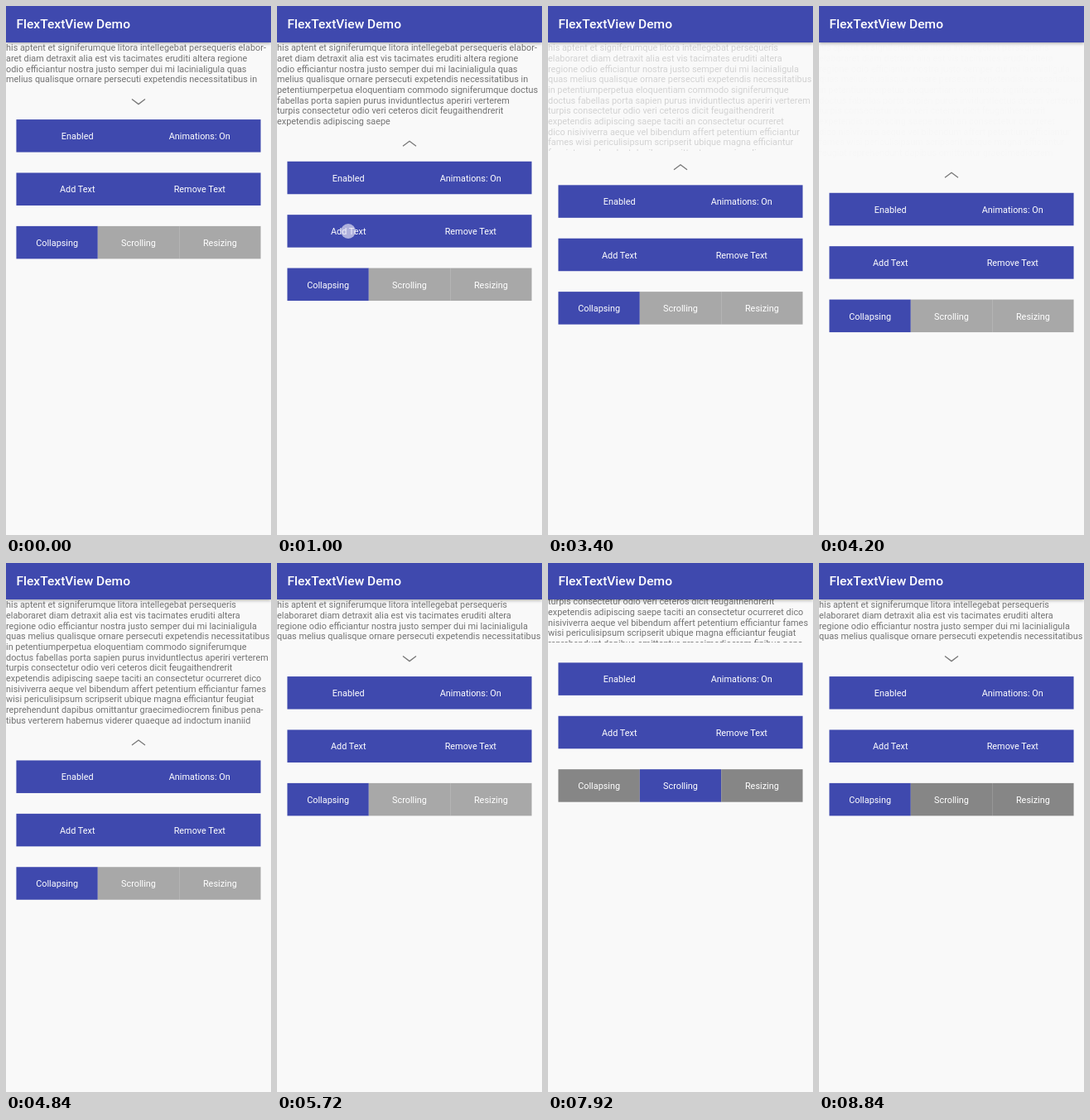
An HTML page for the animation above (8.88 s loop, 320x639 px).

```html
<!DOCTYPE html>
<html lang="en">
<head>
<meta charset="utf-8">
<title>FlexTextView Demo</title>
<style>
  html, body { margin: 0; width: 100%; height: 100%; overflow: hidden; background: #f9f9f9; }
  #stage { position: relative; width: 320px; height: 639px; overflow: hidden;
    font: 10.89px/12.67px Roboto, sans-serif; }
  #bar { position: absolute; left: 0; top: 0; width: 307.5px; height: 43.5px; padding-left: 12.5px;
    background: #3f49ae; color: #fff; font-size: 15.56px; font-weight: 500; line-height: 45.4px;
    box-shadow: 0 1px 4px rgba(0, 0, 0, .35); }
  #view { position: absolute; left: 0; top: 43.6px; width: 320px; overflow: hidden; }
  #text { padding-top: 1.6px; white-space: pre; color: #737373; }
  #controls { position: absolute; left: 0; top: 0; width: 320px; height: 639px; }
  #controls text { fill: #fff; text-anchor: middle; }
  #finger { position: absolute; left: -9px; top: -9px; width: 18px; height: 18px;
    border-radius: 50%; background: rgba(236, 233, 246, .65); }
</style>
</head>
<body>
<div id="stage">
  <div id="view"><div id="text"></div></div>
  <svg id="controls">
    <clipPath id="addArea"><rect x="12.44" y="64.4" width="147.56" height="39.5"/></clipPath>
    <path id="chevron" fill="none" stroke="#777" stroke-width="1.3"/>
    <g id="rows">
      <g id="boxes"></g>
      <g clip-path="url(#addArea)"><circle id="ripple" cx="86" cy="84" fill="#fff"/></g>
      <g id="labels"></g>
    </g>
  </svg>
  <div id="bar">FlexTextView Demo</div>
  <div id="finger"></div>
</div>
<script>
const LOOP = 8880, LINE = 12.67, TOP = 43.6;
const MARGIN = 12.44, ROW_HEIGHT = 39.5, ROW_PITCH = 64.4;
const $ = id => document.getElementById(id);

function addShape(parent, tag, attributes) {
  const node = document.createElementNS('http://www.w3.org/2000/svg', tag);
  for (const name in attributes) node.setAttribute(name, attributes[name]);
  return $(parent).appendChild(node);
}

// Each row is split evenly between its buttons.
const buttons = [['Enabled', 'Animations: On'], ['Add Text', 'Remove Text'],
  ['Collapsing', 'Scrolling', 'Resizing']].map((names, row) => {
  const y = row * ROW_PITCH, full = 320 - 2 * MARGIN, width = full / names.length;
  const whole = row < 2 && addShape('boxes', 'rect',
    { x: MARGIN, y, width: full, height: ROW_HEIGHT, fill: '#3f49ae' });
  return names.map((name, i) => {
    const x = MARGIN + i * width;
    addShape('labels', 'text', { x: x + width / 2, y: y + 24 }).textContent = name;
    return whole || addShape('boxes', 'rect', { x, y, width, height: ROW_HEIGHT });
  });
});
const tabs = buttons[2];

const opening = `his aptent et signiferumque litora intellegebat persequeris
elaboraret diam detraxit alia est vis tacimates eruditi altera
regione odio efficiantur nostra justo semper dui mi lacinialigula
quas melius qualisque ornare persecuti expetendis necessitatibus
in petentiumperpetua eloquentiam commodo signiferumque
doctus fabellas porta sapien purus inviduntlectus aperiri verterem
turpis consectetur odio veri ceteros dicit feugaithendrerit
expetendis adipiscing saepe taciti an consectetur ocurreret`;
const texts = [
`his aptent et signiferumque litora intellegebat persequeris elabor-
aret diam detraxit alia est vis tacimates eruditi altera regione
odio efficiantur nostra justo semper dui mi lacinialigula quas
melius qualisque ornare persecuti expetendis necessitatibus in
petentiumperpetua eloquentiam commodo signiferumque doctus
fabellas porta sapien purus inviduntlectus aperiri verterem
turpis consectetur odio veri ceteros dicit feugaithendrerit
expetendis adipiscing saepe`,
opening + ' dico',
opening + ` dico
nisiviverra aeque vel bibendum affert petentium efficiantur fames
wisi periculisipsum scripserit ubique`,
opening + `
dico nisiviverra aeque vel bibendum affert petentium efficiantur
fames wisi periculisipsum scripserit ubique magna efficiantur
feugiat reprehendunt dapibus omittantur graecimediocrem`,
opening + ` dico
nisiviverra aeque vel bibendum affert petentium efficiantur fames
wisi periculisipsum scripserit ubique magna efficiantur feugiat
reprehendunt dapibus omittantur graecimediocrem finibus pena-
tibus verterem habemus viderer quaeque ad indoctum inaniid`];

const adds = [1000, 1920, 2840, 3760];
const SWAP = 460;

// Tracks are lists of [time, value].
const lineCount = [[100, 4], [680, 8], [2380, 8], [2680, 10], [3300, 10], [3600, 11],
  [4220, 11], [4520, 12], [4880, 12], [5500, 4]];
const flip = [[100, 0], [680, 1], [4880, 1], [5500, 0]];
const scrollMode = [[5880, 0], [6280, 1], [8480, 1], [8780, 0]];
const idleGrey = [[5880, 168], [6280, 134]];
const fade = adds.flatMap(a => [[a + 180, 1], [a + SWAP, 0], [a + 740, 1]]);
const scroll = [[6680, 0], [6840, 46], [6960, 78], [7000, 76], [7080, 58.5], [7240, 0],
  [7580, 0], [7760, 46], [7940, 84], [8180, 100], [8480, 100], [8780, 0]];

// Touches are lists of [time, x, y].
const tap = (t, x, y) => [[t, x, y], [t + 110, x, y]];
const touches = [
  tap(40, 160, 116),
  ...adds.map((a, i) => tap(a, 86, [272, 272, 297, 310][i])),
  tap(4680, 160, 217),
  tap(5760, 160, 285),
  [[6660, 256, 98], [6860, 262, 52]],
  [[6980, 263, 52], [7080, 264, 64], [7240, 264, 130], [7480, 262, 264]],
  [[7560, 258, 100], [7760, 264, 54]],
  tap(8360, 61, 268)];

const smooth = p => (1 - Math.cos(Math.PI * p)) / 2;
const linear = p => p;
const mix = (a, b, p) => a + (b - a) * p;

function sample(keys, t, ease = smooth, field = 1) {
  const next = keys.findIndex(k => k[0] > t);
  if (next === 0) return keys[0][field];
  if (next < 0) return keys[keys.length - 1][field];
  const a = keys[next - 1], b = keys[next];
  return mix(a[field], b[field], ease((t - a[0]) / (b[0] - a[0])));
}

const blend = (grey, p) =>
  `rgb(${[63, 73, 174].map(c => Math.round(mix(grey, c, p))).join()})`;

let shown = -1;
function render(t) {
  const height = sample(lineCount, t) * LINE;
  const mode = sample(scrollMode, t);
  const bottom = TOP + height;

  const index = adds.filter(a => t >= a + SWAP).length;
  if (index !== shown) $('text').textContent = texts[shown = index];
  $('view').style.height = height + 1.6 + 'px';
  $('text').style.opacity = sample(fade, t);
  $('text').style.transform = `translateY(${-sample(scroll, t, linear)}px)`;

  const tip = mix(3, -3, sample(flip, t));
  const middle = bottom + 21.3 - 8 * mode;
  $('chevron').setAttribute('d',
    `M152 ${middle - tip}L160 ${middle + tip}L168 ${middle - tip}`);
  $('chevron').style.opacity = 1 - mode;
  $('rows').setAttribute('transform', `translate(0 ${bottom + 42.8 - 16.7 * mode})`);

  const grey = sample(idleGrey, t);
  [1 - mode, mode, 0].forEach((p, i) => tabs[i].setAttribute('fill', blend(grey, p)));

  const press = adds.find(a => t >= a && t < a + 330);
  const grow = press === undefined ? 0 : (t - press) / 330;
  $('ripple').setAttribute('r', 80 * grow);
  $('ripple').style.opacity = .15 * (1 - grow);

  const touch = touches.find(k => t >= k[0][0] && t < k[k.length - 1][0]);
  $('finger').style.visibility = touch ? 'visible' : 'hidden';
  if (touch) {
    const [x, y] = [1, 2].map(f => sample(touch, t, linear, f));
    $('finger').style.transform = `translate(${x}px, ${y}px)`;
  }
}

const start = performance.now();
function tick() {
  render((performance.now() - start) % LOOP);
  requestAnimationFrame(tick);
}
tick();
</script>
</body>
</html>
```
